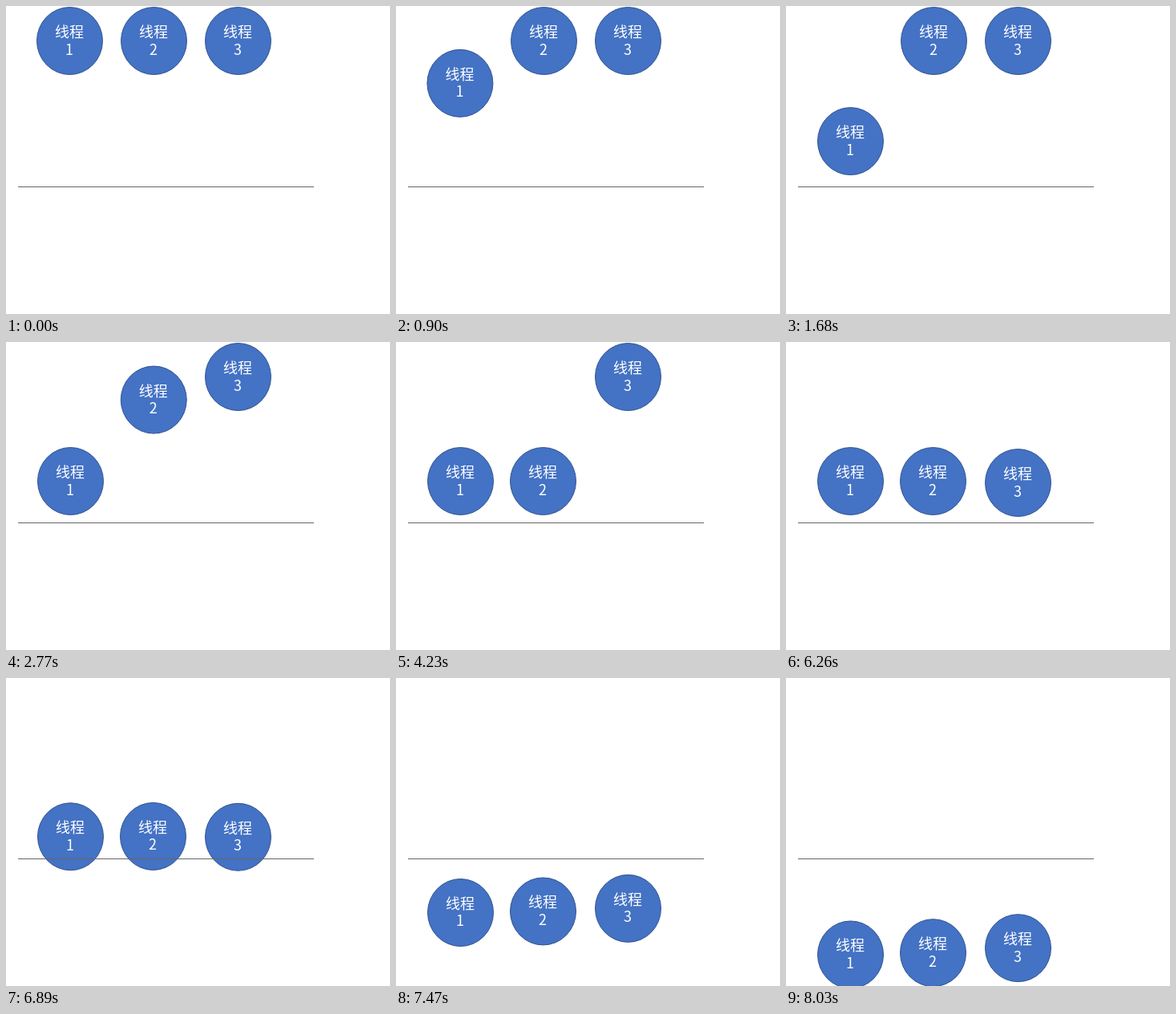
Animation of 479x384 px, one loop 8100 ms. Source, as an HTML page:

```html
<!DOCTYPE html>
<html lang="zh-CN">
<head>
<meta charset="utf-8">
<style>
html, body { margin: 0; width: 100%; height: 100%; overflow: hidden; background: #fff; }
svg { display: block; }
ellipse { fill: #4472c4; stroke: #2f528f; stroke-width: 1; }
text { fill: #fff; font: 18px "Noto Sans CJK SC", "Noto Sans CJK", sans-serif; text-anchor: middle; }
</style>
</head>
<body>
<svg id="stage" width="479" height="384" viewBox="0 0 479 384">
  <rect x="15" y="225" width="369" height="1" fill="#666"/>
</svg>
<script>
const LOOP = 8100;
const STEPS = 117;
const MOVE = 1850;    // length of every move, ms
const RELEASE = 6371; // all threads pass the barrier

// x, start of first move, sideways drift, first fall, second fall
const threads = [
  { x: 79.5, start: 70, drift: 1, fall: 130, drop: 175 },
  { x: 184.5, start: 2160, drift: -1, fall: 130, drop: 172.7 },
  { x: 289.5, start: 4240, drift: 0, fall: 132, drop: 164.5 }
];

const stage = document.getElementById('stage');
const barrier = stage.querySelector('rect');

function add(parent, tag, attrs, text = '') {
  const node = document.createElementNS('http://www.w3.org/2000/svg', tag);
  for (const key in attrs) node.setAttribute(key, attrs[key]);
  node.textContent = text;
  return parent.appendChild(node);
}

threads.forEach((thread, i) => {
  thread.node = add(stage, 'g', {});
  add(thread.node, 'ellipse', { rx: 41, ry: 42 });
  add(thread.node, 'text', { x: -0.5, y: -4.5 }, '线程');
  add(thread.node, 'text', { x: -0.5, y: 17 }, i + 1);
});
stage.append(barrier);

// Constant acceleration, then constant braking
function ease(time, start) {
  const u = Math.min(1, Math.max(0, (time - start) / MOVE));
  return u < 0.5 ? 2 * u * u : 1 - 2 * (1 - u) ** 2;
}

function draw() {
  const now = performance.now() % LOOP;
  const step = Math.floor((now + 8) / LOOP * STEPS) % STEPS;
  const time = step * LOOP / STEPS + 4;
  for (const { node, x, start, drift, fall, drop } of threads) {
    const first = ease(time, start);
    const y = 43.5 + fall * first + drop * ease(time, RELEASE);
    node.setAttribute('transform', `translate(${x + drift * first} ${y})`);
  }
  requestAnimationFrame(draw);
}
draw();
</script>
</body>
</html>
```
